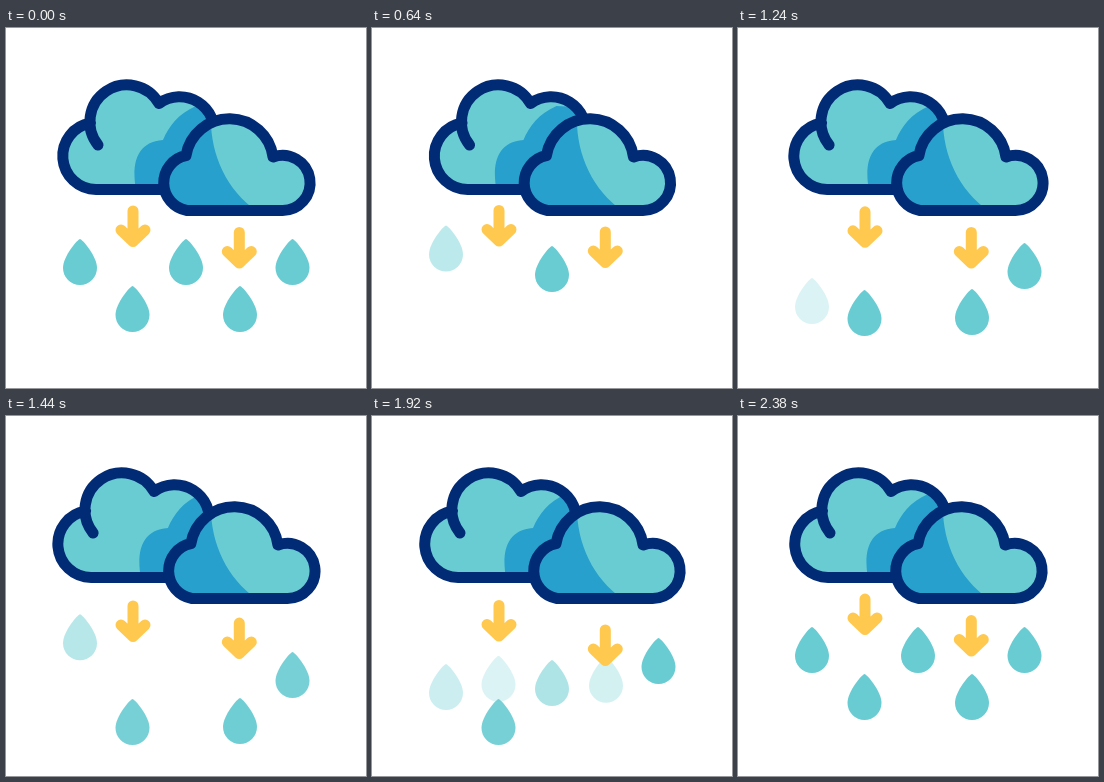
These frames come from a looping animation (360x360 px, 2400 ms). An HTML page:

```html
<!DOCTYPE html>
<html lang="en">
<head>
<meta charset="utf-8">
<title>Rain clouds</title>
<style>
  html, body { margin: 0; width: 100%; height: 100%; overflow: hidden; background: #fff; }
  svg { display: block; width: 100vw; height: 100vh; }
  .line { fill: none; stroke: #022b76; stroke-width: 11; stroke-linecap: round; stroke-linejoin: round; }
  .arrow { fill: none; stroke: #ffc94f; stroke-width: 11; stroke-linecap: round; stroke-linejoin: round; }
  .teal { fill: #68ccd2; }
  .blue { fill: #28a0ce; }
</style>
</head>
<body>
<svg viewBox="0 0 360 360">
  <defs>
    <path id="backShape" d="M84.5 95A33.5 33.5 0 0 0 90 161.5H190L208 110A35 35 0 0 0 153 75.5A37 37 0 0 0 85 95Z"/>
    <path id="frontShape" d="M181 182.5A28 28 0 0 1 180 127.5A44 44 0 0 1 267 129A27.6 27.6 0 0 1 267 129A27.6 27.6 0 1 1 275.5 182.5Z"/>
    <path id="arrowShape" d="M0 183V210M-12 202L0 213.5L12 202"/>
    <clipPath id="backClip"><use href="#backShape"/></clipPath>
    <clipPath id="frontClip"><use href="#frontShape"/></clipPath>
  </defs>
  <g id="drops"></g>
  <use id="arrow1" class="arrow" href="#arrowShape"/>
  <use id="arrow2" class="arrow" href="#arrowShape"/>
  <g id="back">
    <use class="teal" href="#backShape"/>
    <g clip-path="url(#backClip)">
      <path id="shadow" class="blue" d="M130 162C126 140 128 114 157 112C163 98 172 86 190 78L230 80V165Z"/>
    </g>
    <path class="line" d="M92 117A37 37 0 1 1 153 75.5A35 35 0 0 1 208 110M84.5 95A33.5 33.5 0 0 0 90 161.5H175"/>
  </g>
  <g id="front">
    <use class="teal" href="#frontShape"/>
    <g clip-path="url(#frontClip)">
      <path id="shade" class="blue" d="M205 84C203 125 220 162 252 184H130V84Z"/>
    </g>
    <use class="line" href="#frontShape"/>
  </g>
</svg>
<script>
const LOOP = 2400, STEP = 20, HIGH = -24, LOW = 44, SPEED = 0.105;
const $ = id => document.getElementById(id);
const clamp = v => Math.max(0, Math.min(1, v));
const ease = p => p * p * (3 - 2 * p);

// Eased value between [time, value] keys
function follow(keys, t) {
  const i = keys.findIndex(k => k[0] > t);
  const [t0, a] = keys[i - 1], [t1, b] = keys[i];
  return a + (b - a) * ease((t - t0) / (t1 - t0));
}

const sway = [[0, 0], [800, 6.2], [1600, -6.2], [LOOP, 0]];
const bob1 = [[0, 0], [400, -4], [880, 3], [1160, 0], [1600, 10], [LOOP, 0]];
const bob2 = [[0, 0], [400, -8], [880, 7], [1240, 0], [1840, 10], [LOOP, 0]];

// Resting drops leave after a delay and re-enter later; passes are [start, end]
const columns = [
  { x: 74,    y: 211, leave: 220, enter: 1960, passes: [[520, 1297], [1331, 1988]] },
  { x: 126.5, y: 258, leave: 160, enter: 1865, passes: [[973, 1621], [1568, 2057]] },
  { x: 180,   y: 211, leave: 0,   enter: 1960, passes: [[342, 997], [1451, 2011]] },
  { x: 234,   y: 258, leave: 140, enter: 1855, passes: [[983, 1631]] },
  { x: 286.5, y: 211, leave: 65,  enter: 2140, passes: [[973, 1621], [1582, 2239]] }
];

const drops = [];
function addDrop(col, fall) {
  const el = document.createElementNS("http://www.w3.org/2000/svg", "path");
  el.setAttribute("class", "teal");
  el.setAttribute("d", "M0 0C2 0 17 17 17 29A17 17 0 0 1-17 29C-17 17-2 0 0 0Z");
  $("drops").append(el);
  drops.push({ el, col, fall });
}
for (const col of columns) {
  addDrop(col, t => t < col.enter
    ? Math.max(0, (t - col.leave) * SPEED)
    : Math.min(0, HIGH + (t - col.enter) * SPEED));
  for (const [start, end] of col.passes)
    addDrop(col, t => HIGH + (LOW - HIGH) * (t - start) / (end - start));
}

function move(el, x, y) {
  el.setAttribute("transform", `translate(${x.toFixed(2)} ${y.toFixed(2)})`);
}

function draw(t) {
  const dx = follow(sway, t);
  move($("back"), dx, 0);
  move($("front"), -dx, 0);
  move($("shadow"), -2 * dx, 0);
  move($("shade"), dx, 0);
  move($("arrow1"), 127, follow(bob1, t));
  move($("arrow2"), 233.3, 21.5 + follow(bob2, t));
  for (const { el, col, fall } of drops) {
    const dy = fall(t);
    const alpha = clamp((dy - HIGH) / 24) * clamp((LOW - dy) / 21);
    el.setAttribute("opacity", alpha.toFixed(3));
    move(el, col.x, col.y + dy);
  }
}

const begin = performance.now();
function tick() {
  const t = (performance.now() - begin) % LOOP;
  draw(Math.floor(t / STEP) * STEP);
  requestAnimationFrame(tick);
}
tick();
</script>
</body>
</html>
```
